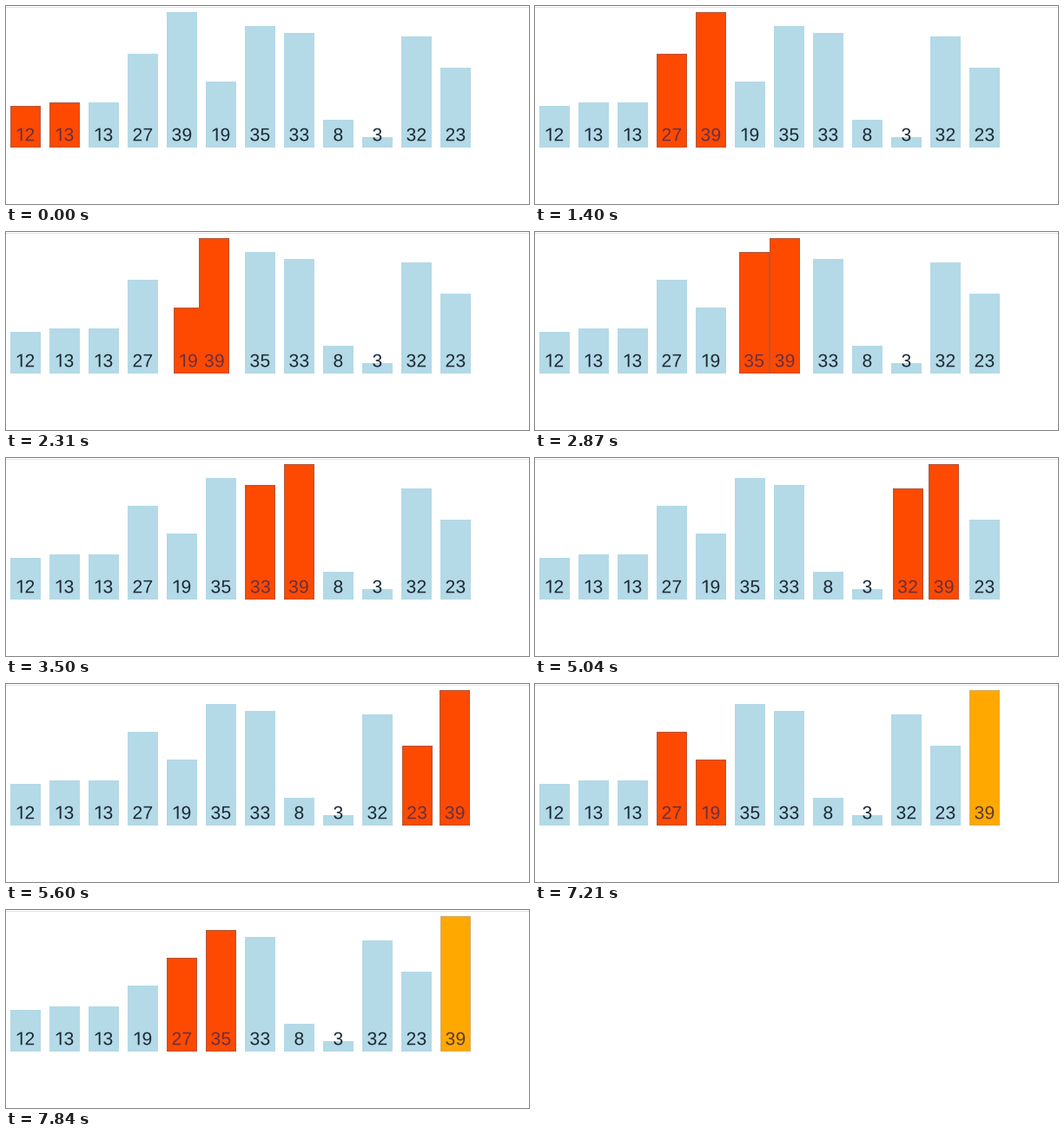
Recreate the animation shown at these times as a matplotlib script. Size 602 by 228 pixels, loop 8000 ms.

```python
import numpy as np
import matplotlib.pyplot as plt
from matplotlib.animation import FuncAnimation
from matplotlib.patches import PathPatch, Rectangle
from matplotlib.path import Path
from matplotlib.textpath import TextPath
from matplotlib.transforms import Affine2D

W, H, DPI = 602, 228, 64
LOOP, INTERVAL, TICK = 8000, 20, 70

VALUES = [12, 13, 13, 27, 39, 19, 35, 33, 8, 3, 32, 23]
COUNT = len(VALUES)
LEFT, PITCH, BAR_W, BASE, UNIT = 5, 45, 35, 163, 4
FONT_PX, TEXT_BASE = 21, 155.3

# fill, rim, label
IDLE = ("#b4d9e7", "#b4d9e7", "#1b2a35")
COMPARE = ("#fe4a00", "#b4563f", "#6b2f40")
SORTED = ("#ffa800", "#d6ac66", "#593a38")

# ms: first comparison, time per comparison, pause before a swap, swap length
START, PERIOD, PAUSE, SWAP_MS = -190, 528, 175, 400


def ease(ms):
    """CSS 'ease', cubic-bezier(.25, .1, .25, 1)."""
    s = np.linspace(0, 1, 200)
    x = 0.75 * s * (1 - s) ** 2 + 0.75 * s**2 * (1 - s) + s**3
    y = 0.3 * s * (1 - s) ** 2 + 3 * s**2 * (1 - s) + s**3
    return np.interp(ms / SWAP_MS, x, y)


def state(t):
    """Replay the bubble sort: bar positions, compared pair, sorted bars."""
    order = list(range(COUNT))
    pos = np.arange(COUNT, dtype=float)
    begin = START
    for last in range(COUNT - 1, 0, -1):
        for slot in range(last):
            a, b = order[slot:slot + 2]
            moved = t - begin - PAUSE
            if moved > 0 and VALUES[a] > VALUES[b]:
                pos[a] = slot + ease(moved)
                pos[b] = slot + 1 - ease(moved)
                order[slot:slot + 2] = b, a
            begin += PERIOD
            if begin > t:
                return pos, (a, b), order[last + 1:]


def digit(ch):
    """Outline and advance of one digit; the 1 has no foot."""
    if ch == "1":
        pts = np.array([(0.25, 0), (0.25, 0.61), (0.06, 0.49), (0.06, 0.575),
                        (0.255, 0.70), (0.34, 0.70), (0.34, 0), (0.25, 0)])
        return Path(pts * FONT_PX, closed=True), 0.48 * FONT_PX
    path = TextPath((0, 0), ch, size=FONT_PX, prop={"family": "Liberation Sans"})
    return Path(path.vertices, path.codes), 0.57 * FONT_PX


def label_path(text):
    parts, x = [], 0
    for ch in text:
        path, advance = digit(ch)
        parts.append(path.transformed(Affine2D().translate(x, 0)))
        x += advance
    flip = Affine2D().translate(-x / 2, 0).scale(1, -1)
    return Path.make_compound_path(*parts).transformed(flip)


fig = plt.figure(figsize=(W / DPI, H / DPI), dpi=DPI, facecolor="white")
ax = fig.add_axes([0, 0, 1, 1])
ax.set(xlim=(0, W), ylim=(H, 0))
ax.axis("off")
ax.add_patch(Rectangle((0, 1), W, 1, fc="#e4e4e4", lw=0))

rims, fills, labels = [], [], []
for value in VALUES:
    h = value * UNIT
    rims.append(Rectangle((0, BASE - h), BAR_W, h, lw=0, zorder=2))
    fills.append(Rectangle((0, BASE - h + 1), BAR_W - 2, h - 2, lw=0, zorder=3))
    labels.append(PathPatch(label_path(str(value)), lw=0, zorder=4))
    for patch in (rims[-1], fills[-1], labels[-1]):
        ax.add_patch(patch)


def draw(frame):
    t = (frame * INTERVAL + INTERVAL // 2) // TICK * TICK
    pos, pair, done = state(t)
    for i, value in enumerate(VALUES):
        fill, rim, ink = COMPARE if i in pair else SORTED if i in done else IDLE
        if value * UNIT < FONT_PX:
            ink = IDLE[2]
        x = LEFT + PITCH * pos[i]
        rims[i].set(x=x, facecolor=rim)
        fills[i].set(x=x + 1, facecolor=fill)
        labels[i].set_facecolor(ink)
        shift = Affine2D().translate(x + BAR_W / 2, TEXT_BASE)
        labels[i].set_transform(shift + ax.transData)
    return rims + fills + labels


anim = FuncAnimation(fig, draw, frames=LOOP // INTERVAL, interval=INTERVAL,
                     repeat=True, repeat_delay=0)
plt.show()
```
